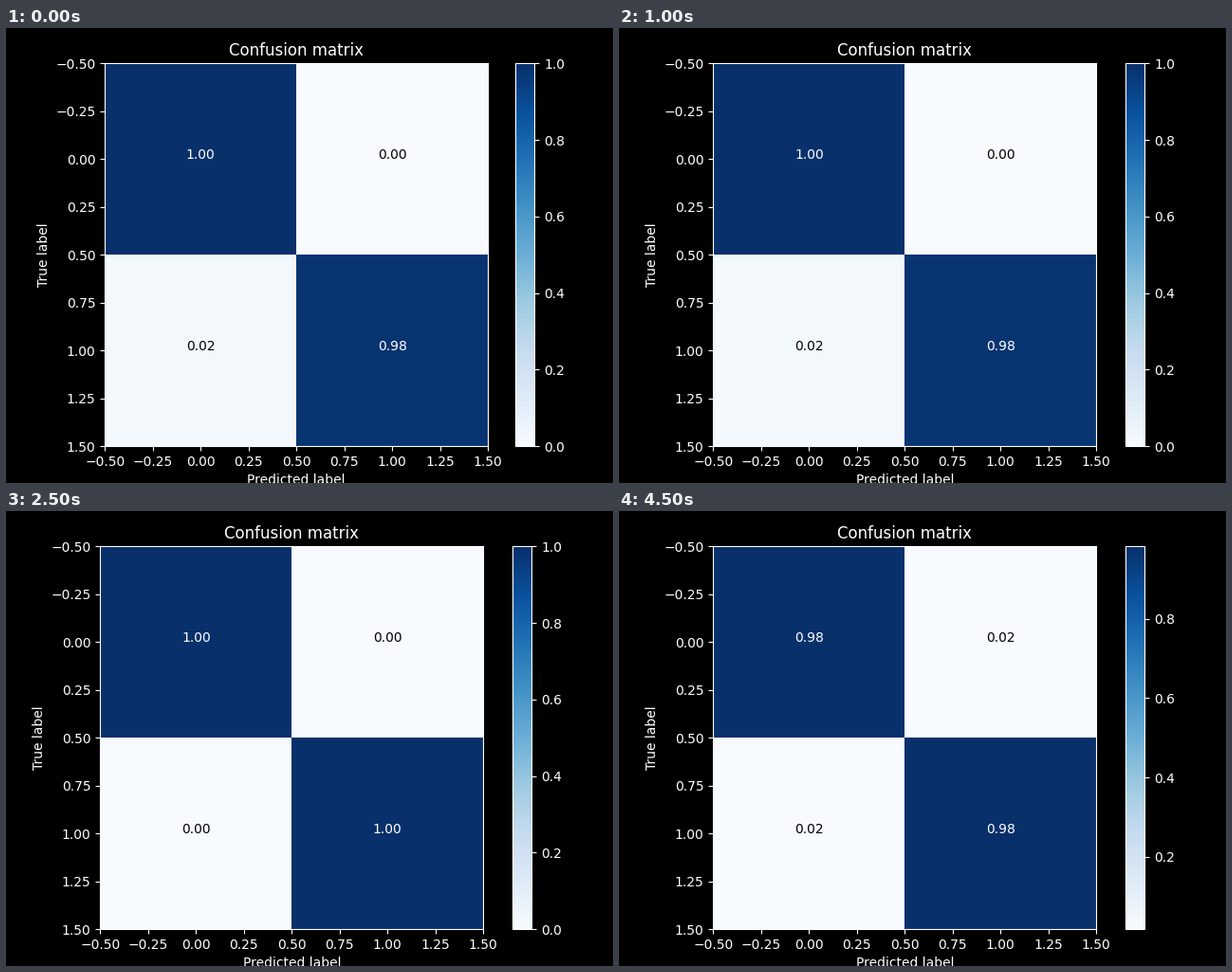
Recreate the animation shown at these times as a matplotlib script. Size 640 by 480 pixels, loop 5 s.

```python
import matplotlib.pyplot as plt
import numpy as np
from matplotlib.animation import FuncAnimation

plt.style.use("dark_background")

W, H, DPI = 640, 480, 100
BOTTOM, SIZE = 38.8, 403.8          # pixels, measured from the lower edge
BAR_WIDTH = SIZE / 20
MISS = 1 / 56

# Share of wrong predictions for each true label, one pair per fold
FOLDS = [
    (0, MISS), (MISS, 0), (0, MISS), (0, 0), (MISS, 0),
    (0, 0), (0, 0), (0, 0), (1 / 61, 1 / 61), (MISS, MISS),
]

fig = plt.figure(figsize=(W / DPI, H / DPI), dpi=DPI)


def add_axes(left, width):
    return fig.add_axes([left / W, BOTTOM / H, width / W, SIZE / H])


def draw_fold(index):
    fig.clear()
    first, second = FOLDS[index]
    matrix = np.array([[1 - first, first], [second, 1 - second]])

    # The layout settles a few pixels to the left after the first fold
    left, bar_left = (104.3, 537.3) if index == 0 else (99.4, 534.1)
    ax = add_axes(left, SIZE)
    image = ax.imshow(matrix, cmap="Blues", interpolation="nearest", aspect="auto")
    fig.colorbar(image, cax=add_axes(bar_left, BAR_WIDTH))

    for (row, col), value in np.ndenumerate(matrix):
        color = "white" if value > matrix.max() / 2 else "black"
        ax.text(col, row, f"{value:.2f}", ha="center", color=color)

    ax.set_title("Confusion matrix")
    ax.set_ylabel("True label")
    ax.set_xlabel("Predicted label")
    return []


anim = FuncAnimation(fig, draw_fold, frames=len(FOLDS), interval=500,
                     repeat=True, repeat_delay=0)
plt.show()
```
